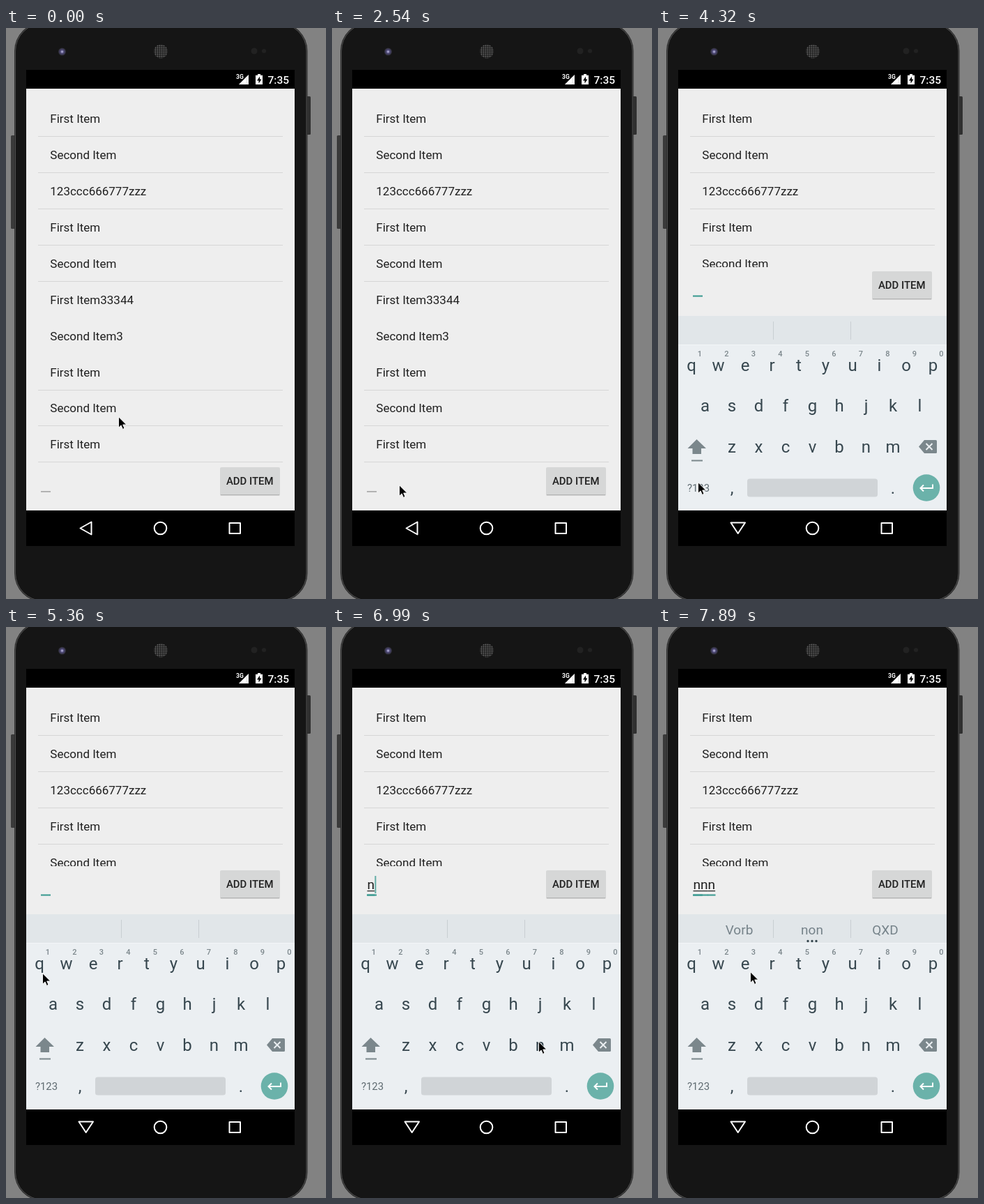
These frames come from a looping animation (459x819 px, 8000 ms). An HTML page:

```html
<!DOCTYPE html>
<html lang="en">
<head>
<meta charset="utf-8">
<title>Phone list with keyboard</title>
<style>
html, body { margin: 0; width: 100%; height: 100%; overflow: hidden; background: #828282; }
svg { display: block; width: 459px; height: 819px; font-family: Roboto, "Noto Sans", sans-serif; }
.row { font-size: 17px; fill: #202020; }
.key { font-size: 24px; fill: #37474f; text-anchor: middle; }
.hint { font-size: 11px; font-weight: 500; fill: #7b868b; text-anchor: middle; }
.word { font-size: 19px; fill: #76838a; text-anchor: middle; }
.nav { fill: none; stroke: #fff; stroke-width: 2; stroke-linejoin: round; }

/* every state change is a hard cut on an 8 s clock */
.a { animation: 8s step-end infinite; }
.focus { animation-name: focus; }
.blur { animation-name: blur; }
.open { animation-name: open; }
.shut { animation-name: shut; }
.footer { animation-name: lift; }
.board { animation-name: slide; }
.n0 { animation-name: n0; }
.n1 { animation-name: n1; }
.n2 { animation-name: n2; }
.words { animation-name: words; }
.caret { animation-name: blink, advance; }
.mouse { animation-name: mouse; }

@keyframes focus { 0% { opacity: 0 } 50.25%, 100% { opacity: 1 } }
@keyframes blur { 0% { opacity: 1 } 50.25%, 100% { opacity: 0 } }
@keyframes open { 0% { opacity: 0 } 52.125%, 100% { opacity: 1 } }
@keyframes shut { 0% { opacity: 1 } 52.125%, 100% { opacity: 0 } }
@keyframes lift { 0% { transform: none } 52.125%, 100% { transform: translateY(-281px) } }
@keyframes slide {
  0% { transform: translateY(8px) }
  54% { transform: translateY(1px) }
  55.875%, 100% { transform: none }
}
@keyframes n0 { 0% { opacity: 0 } 87.375%, 100% { opacity: 1 } }
@keyframes n1 { 0% { opacity: 0 } 89.25%, 100% { opacity: 1 } }
@keyframes n2 { 0% { opacity: 0 } 91.125%, 100% { opacity: 1 } }
@keyframes words { 0% { opacity: 0 } 93%, 100% { opacity: 1 } }
@keyframes blink {
  0%, 54%, 67%, 80%, 96.75%, 100% { opacity: 0 }
  50.25%, 61.375%, 72.5%, 85.625% { opacity: 1 }
}
@keyframes advance {
  0% { transform: none }
  87.375% { transform: translateX(10.5px) }
  89.25% { transform: translateX(21px) }
  91.125%, 100% { transform: translateX(31.5px) }
}
@keyframes mouse {
  0% { transform: translate(161px, 557px) }
  1.875% { transform: translate(153px, 578px) }
  3.75% { transform: translate(148px, 589px) }
  7.5% { transform: translate(148px, 590px) }
  20.625% { transform: translate(144px, 605px) }
  22.5% { transform: translate(136px, 630px) }
  24.25% { transform: translate(131px, 644px) }
  29.875% { transform: translate(112px, 651px) }
  31.75% { transform: translate(96px, 655px) }
  39.125% { transform: translate(88px, 648px) }
  41% { transform: translate(72px, 639px) }
  42.875% { transform: translate(61px, 638px) }
  44.75% { transform: translate(56px, 645px) }
  46.625% { transform: translate(57px, 651px) }
  63.25% { transform: translate(55px, 649px) }
  65.125% { transform: translate(46px, 565px) }
  67% { transform: translate(52px, 496px) }
  68.875% { transform: translate(56px, 498px) }
  70.75% { transform: translate(78px, 510px) }
  72.5% { transform: translate(130px, 535px) }
  74.375% { transform: translate(195px, 563px) }
  76.25% { transform: translate(252px, 588px) }
  78.125% { transform: translate(287px, 603px) }
  80% { transform: translate(295px, 608px) }
  81.875% { transform: translate(297px, 600px) }
  83.75% { transform: translate(296px, 594px) }
  91.125% { transform: translate(270px, 590px) }
  93% { transform: translate(176px, 564px) }
  94.875% { transform: translate(168px, 542px) }
  96.75% { transform: translate(148px, 512px) }
  98.625%, 100% { transform: translate(132px, 494px) }
}
</style>
</head>
<body>
<svg viewBox="0 0 459 819">
  <defs>
    <pattern id="mesh" width="3" height="3" patternUnits="userSpaceOnUse">
      <rect width="3" height="3" fill="#1c1c1c"/>
      <circle cx="1.5" cy="1.5" r="1" fill="#6a6a6a"/>
    </pattern>
    <radialGradient id="lens">
      <stop offset="0" stop-color="#c9c6ee"/>
      <stop offset=".45" stop-color="#4f4a78"/>
      <stop offset="1" stop-color="#2a2a30"/>
    </radialGradient>
  </defs>

  <!-- phone -->
  <rect width="459" height="819" fill="#828282"/>
  <rect x="7" y="154" width="7" height="134" rx="1.5" fill="#3a3a3a"/>
  <rect x="430" y="98" width="7" height="55" rx="1.5" fill="#303030"/>
  <rect x="12" y="-8" width="420.5" height="831" rx="41" fill="#2b2b2b"/>
  <rect x="13.5" y="-6.5" width="417.5" height="828" rx="39.5" fill="#151515" stroke="#505050"/>
  <circle cx="80.500" cy="34" r="5.500" fill="url(#lens)"/>
  <circle cx="222" cy="33.500" r="10" fill="url(#mesh)"/>
  <circle cx="356" cy="33" r="4.500" fill="#222"/>
  <circle cx="370" cy="33" r="3" fill="#222"/>
  <rect x="29" y="60" width="385" height="683"/>

  <!-- status bar -->
  <g fill="#fff">
    <text x="330" y="73" font-size="8.500" font-weight="700">3G</text>
    <path d="M348 67V81H334Z" fill="#777"/>
    <path d="M345 70V81H334Z"/>
    <path d="M348 67V81H344V71Z" fill="#eee"/>
    <path d="M361 66h4v1.800h3V81h-10V67.800h3Z"/>
    <path d="M364 69.500l-4 6h2.500v4l4-6H364Z" fill="#000"/>
    <text x="375.500" y="79.500" font-size="15.500" font-weight="500">7:35</text>
  </g>

  <!-- app -->
  <rect x="29" y="87" width="385" height="605" fill="#eee"/>
  <g id="list"></g>
  <rect class="a open" x="29" y="343" width="385" height="349" fill="#eee"/>

  <g class="a footer">
    <rect x="307" y="631" width="86" height="40" rx="2" fill="#000" opacity=".12"/>
    <rect x="307" y="630" width="86" height="39.500" rx="2" fill="#d6d7d7"/>
    <path d="M308 669.500H392" stroke="#b4b5b5"/>
    <text x="349.700" y="655" font-size="14.900" font-weight="500" text-anchor="middle" fill="#202020">ADD ITEM</text>
    <rect class="a blur" x="50" y="664.500" width="14" height="1" fill="#777"/>
    <rect class="a focus" x="50" y="664.500" width="14" height="2" fill="#35978d"/>
    <g id="typed" font-size="19.100" fill="#202020"></g>
    <rect class="a caret" x="51" y="638" width="1.500" height="25" fill="#35978d"/>
  </g>

  <!-- keyboard -->
  <g class="a open">
    <g class="a board">
      <rect x="29" y="412" width="385" height="280" fill="#ebeff2"/>
      <rect x="29" y="412" width="385" height="41" fill="#e1e6e9"/>
      <path d="M29 453.500H414" stroke="#f3f6f8"/>
      <path d="M165.500 420V446M276.500 420V446" stroke="#c8ced2"/>
      <g class="a words">
        <text class="word" x="116.500" y="441">Vorb</text>
        <text class="word" x="221" y="441">non</text>
        <text class="word" x="326" y="441">QXD</text>
        <path d="M215 450.500h0m6 0h0m6 0h0" stroke="#37474f" stroke-width="3.400" stroke-linecap="round"/>
      </g>
      <g id="keys"></g>
      <g fill="#7b878c">
        <path d="M55.500 589L69 602H62V610H49.500V602H42.500Z"/>
        <rect x="48" y="618.500" width="16" height="2"/>
        <path d="M374 599.500L382 590H398.500Q400 590 400 591.500V607.500Q400 609 398.500 609H382Z"/>
        <path d="M384.500 595l9 9m0-9l-9 9" stroke="#ebeff2" stroke-width="2"/>
      </g>
      <text x="58" y="664" font-size="14.900" text-anchor="middle" fill="#5f6b71">?123</text>
      <text class="key" x="106" y="667">,</text>
      <text class="key" x="337" y="667">.</text>
      <rect x="128" y="645.500" width="187" height="26" rx="3.500" fill="#d0d4d7"/>
      <circle cx="385" cy="658.500" r="19.300" fill="#6bb2aa"/>
      <path d="M394 653.500V659H377M381 654.500L376.500 659L381 663.500" fill="none" stroke="#fff" stroke-width="2"/>
    </g>
  </g>

  <!-- navigation bar -->
  <rect x="29" y="692" width="385" height="51"/>
  <path class="nav a shut" d="M106.500 717.500L122.500 708.500V726.500Z"/>
  <path class="nav a open" d="M104.500 709.500H125L114.700 725Z"/>
  <circle class="nav" cx="221.500" cy="717.500" r="8.800"/>
  <rect class="nav" x="320.500" y="710" width="15.500" height="15"/>

  <path class="a mouse" d="M.5 .8V16.200L4.100 12.900L6.500 18.400L9 17.300L6.700 12H11.700Z" fill="#000" stroke="#fff" stroke-width=".9"/>
</svg>

<script>
const fill = (id, items, draw) =>
  document.getElementById(id).innerHTML = items.map(draw).join('');

const rows = ['First Item', 'Second Item', '123ccc666777zzz', 'First Item', 'Second Item',
  'First Item33344', 'Second Item3', 'First Item', 'Second Item', 'First Item'];
const bare = [5, 6]; // rows without a divider
fill('list', rows, (label, i) => {
  const line = Math.round(155 + 51.93 * i) + .5;
  return `<text class="row" x="63.3" y="${136 + 51.93 * i}">${label}</text>` +
    (bare.includes(i) ? '' : `<path d="M46 ${line}H397" stroke="#d6d6d6"/>`);
});

fill('typed', [0, 1, 2], i => {
  const x = 50.5 + 10.5 * i;
  return `<g class="a n${i}"><text x="${x}" y="657">n</text>
    <rect x="${x}" y="659" width="10.6" height="1.2"/>
    <rect x="${x}" y="664.5" width="11" height="2" fill="#35978d"/></g>`;
});

const pitch = 38.5;
fill('keys', [['qwertyuiop', 48], ['asdfghjkl', 67.5], ['zxcvbnm', 106]], ([letters, left], r) =>
  [...letters].map((c, i) => {
    const x = left + pitch * i;
    const hint = r ? '' : `<text class="hint" x="${x + 12}" y="470">${(i + 1) % 10}</text>`;
    return `<text class="key" x="${x}" y="${490.5 + 58.5 * r}">${c}</text>${hint}`;
  }).join(''));
</script>
</body>
</html>
```
